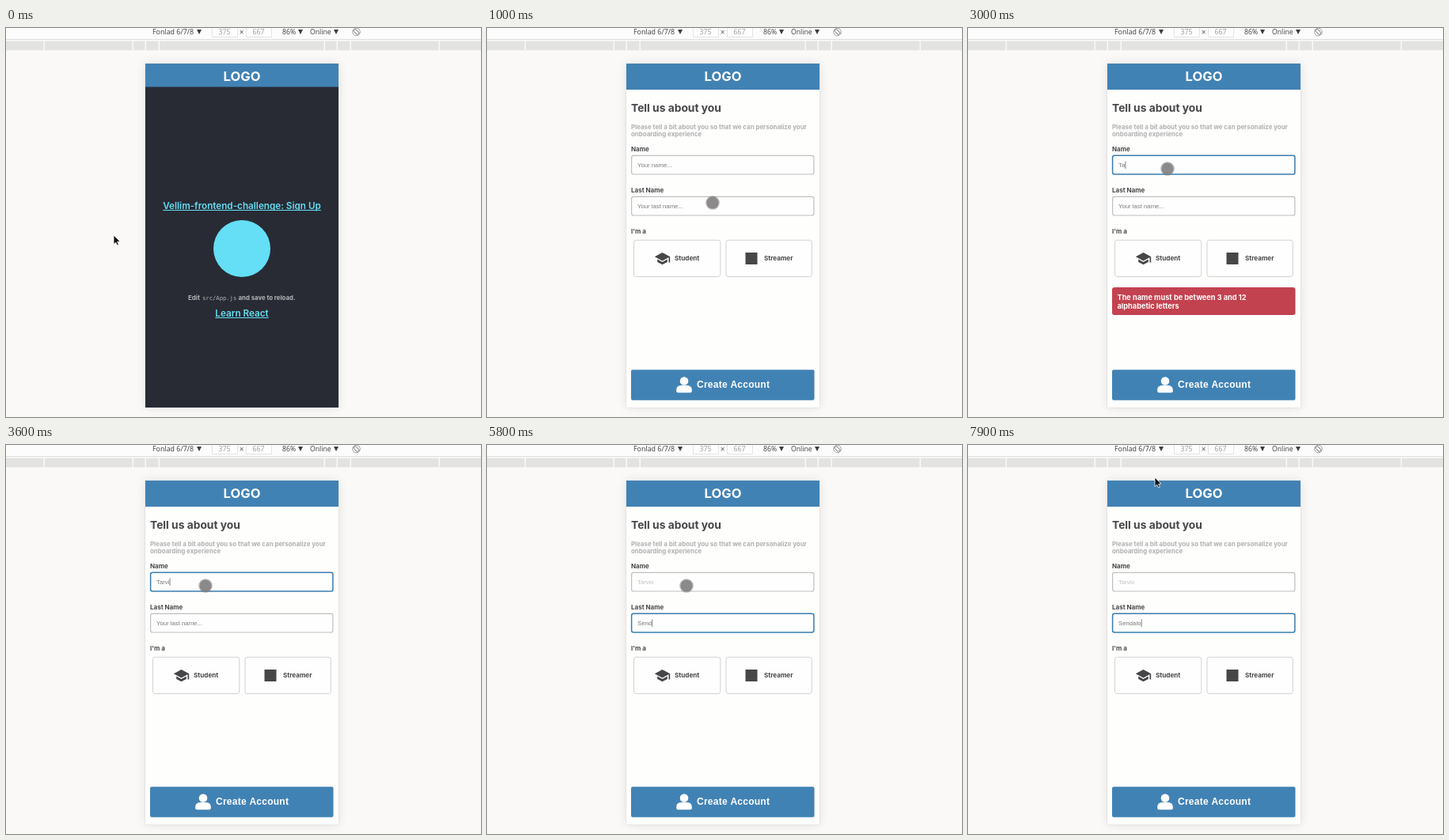
An HTML page with a canvas that plays this animation: 600 px wide and 492 px high, repeating every 8 s.

```html
<!DOCTYPE html>
<html lang="en">
<head>
<meta charset="utf-8">
<title>Sign up form</title>
<style>
html, body { margin: 0; width: 100%; height: 100%; overflow: hidden; background: #faf9f8; }
canvas { display: block; width: 600px; height: 492px; }
</style>
</head>
<body>
<canvas id="stage"></canvas>
<script>
const W = 600, H = 492, LOOP = 8000, STEP = 100;
const canvas = document.getElementById('stage');
const ctx = canvas.getContext('2d');
const dpr = window.devicePixelRatio || 1;
canvas.width = W * dpr;
canvas.height = H * dpr;

const SANS = 'Inter, sans-serif';
const ARIAL = '"Liberation Sans", Arial, sans-serif';
const UI = '"Open Sans", sans-serif';
const MONO = '"DejaVu Sans Mono", monospace';
const BLUE = '#4182b4', CYAN = '#64dff5', INK = '#474648';

const FIRST = 'Tarvio', LAST = 'Sendalo';
const FIRST_KEYS = [2700, 3000, 3300, 3500, 3600, 3800];
const LAST_KEYS = [4800, 5400, 5600, 5700, 6000, 6700, 6700];
const PAGE_AT = 1000, FOCUS_FIRST = 1700, FOCUS_LAST = 4400;

// Pointer stops: time, x, y
const PATH = [
  [0, 136, 262], [100, 136, 262], [800, 285, 221], [1000, 285, 221],
  [1700, 252, 178], [7300, 252, 178], [7900, 236, 41], [8000, 236, 41]
];

function rect(x, y, w, h, color) {
  ctx.fillStyle = color;
  ctx.fillRect(x, y, w, h);
}

function box(x, y, w, h, r, fill, stroke, line = 1) {
  ctx.beginPath();
  ctx.roundRect(x, y, w, h, r);
  if (fill) { ctx.fillStyle = fill; ctx.fill(); }
  if (stroke) { ctx.strokeStyle = stroke; ctx.lineWidth = line; ctx.stroke(); }
}

function disc(x, y, r, color) {
  ctx.beginPath();
  ctx.arc(x, y, r, 0, Math.PI * 2);
  ctx.fillStyle = color;
  ctx.fill();
}

function poly(points, fill, stroke) {
  ctx.beginPath();
  points.forEach(([x, y]) => ctx.lineTo(x, y));
  ctx.closePath();
  ctx.fillStyle = fill;
  ctx.fill();
  if (stroke) { ctx.strokeStyle = stroke; ctx.lineWidth = 0.8; ctx.stroke(); }
}

function text(str, x, y, size, color, { weight = 700, family = SANS, align = 'left', gap = 0 } = {}) {
  ctx.font = `${weight} ${size}px ${family}`;
  ctx.letterSpacing = gap + 'px';
  ctx.textAlign = align;
  ctx.fillStyle = color;
  ctx.fillText(str, x, y);
  return ctx.measureText(str).width;
}

function link(str, x, y, size) {
  const w = text(str, x, y, size, CYAN, { weight: 600, align: 'center' });
  rect(x - w / 2, y + 1.5, w, 1, CYAN);
}

function toolbar() {
  rect(0, 0, W, 16, '#fdfcfc');
  rect(0, 14, W, 1, '#dedddc');
  const ui = { weight: 400, family: UI };
  const down = x => poly([[x - 3, 2], [x + 3, 2], [x, 8]], '#3c3c3c');
  text('Fonlad 6/7/8', 185, 8, 8.9, '#3c3c3c', ui);
  down(244);
  for (const [x, n] of [[260, '375'], [303, '667']]) {
    box(x + 0.5, -4.5, 32, 16, 0, '#fdfdfd', '#e4e3e3');
    text(n, x + 16, 8, 8.7, '#9b9b9b', { ...ui, align: 'center' });
  }
  text('×', 297.5, 9, 10, '#555', { ...ui, align: 'center' });
  text('86%', 349, 8, 8.7, '#3c3c3c', ui);
  down(372);
  text('Online', 384, 8, 8.7, '#3c3c3c', ui);
  down(417);

  ctx.save();
  ctx.translate(442.5, 5);
  ctx.rotate(-Math.PI / 4);
  box(-1.8, -3.6, 3.6, 7.2, 1, null, '#666', 0.9);
  ctx.restore();
  ctx.beginPath();
  ctx.arc(442.5, 5, 4.8, 0, Math.PI * 2);
  ctx.strokeStyle = '#888';
  ctx.lineWidth = 0.8;
  ctx.stroke();

  rect(0, 16.5, W, 11.7, '#e3e3e1');
  for (const x of [48, 160, 176, 193, 402, 418, 435, 547]) rect(x - 0.5, 16, 1.5, 12.5, '#fbfafa');
}

function phone(color, headerHeight) {
  ctx.save();
  ctx.shadowColor = 'rgba(0,0,0,0.1)';
  ctx.shadowBlur = 12 * dpr;
  rect(176, 45, 244, 435, color);
  ctx.restore();
  box(175.5, 44.5, 245, 436, 0, null, 'rgba(0,0,0,0.04)');
  rect(176, 45, 244, headerHeight, BLUE);
  text('LOGO', 298, 67, 16.6, '#fff', { align: 'center' });
}

function home() {
  phone('#282b34', 29.5);
  link('Vellim-frontend-challenge: Sign Up', 298, 228.5, 11.7);
  disc(298, 279, 36, CYAN);
  text('Edit', 230, 344, 7.9, '#b4b5b8');
  text('src/App.js', 248, 344, 7.2, '#b4b5b8', { weight: 400, family: MONO });
  text('and save to reload.', 293.5, 344, 7.8, '#b4b5b8');
  link('Learn React', 298, 364.5, 11.7);
}

function typed(word, keys, t) {
  return word.slice(0, keys.filter(k => k <= t).length);
}

function caretOn(t, start, keys) {
  const last = Math.max(start, ...keys.filter(k => k <= t));
  return Math.floor((t - last) / 500) % 2 === 0;
}

function field(label, y, hint, value, focused, caret) {
  text(label, 182, y - 5.5, 8, INK);
  box(182.6, y + 0.3, 230.3, 23.7, 2.5, '#fefefe', focused ? '#3a7db0' : '#c0bfbf', focused ? 1.5 : 1.2);
  const color = !value ? '#7b7b7b' : focused ? '#777' : '#c2c2c2';
  const w = text(value || hint, 190, y + 15, 7.75, color, { weight: 400, family: ARIAL });
  if (focused && caret) rect(190 + (value ? w + 0.3 : 0), y + 7.5, 0.8, 9.5, '#666');
}

function choice(x, w, label, labelX) {
  box(x, 268.3, w, 46.2, 3, '#fefefe', '#d3d2d2');
  text(label, labelX, 294, 8.1, INK);
}

function cap() {
  poly([[211.8, 289.3], [221.5, 284], [231.2, 289.3], [221.5, 294.6]], INK);
  poly([[215.2, 292.4], [221.5, 295.9], [227.8, 292.4], [227.8, 295.9], [221.5, 299.2], [215.2, 295.9]], INK);
  rect(229.5, 289.3, 1.7, 7.2, INK);
}

function alertBox(subject) {
  box(182, 328, 231.5, 35, 3, '#c3424f');
  text(`The ${subject} must be between 3 and 12`, 188.5, 343.8, 9.2, '#fff');
  text('alphabetic letters', 188.5, 354.6, 9.2, '#fff');
}

function form(t) {
  phone('#fefefd', 33);
  text('Tell us about you', 182, 106, 13.8, INK);
  text('Please tell a bit about you so that we can personalize your', 182, 128, 7.9, '#b1b0b0');
  text('onboarding experience', 182, 137, 7.9, '#b1b0b0');

  const first = typed(FIRST, FIRST_KEYS, t), last = typed(LAST, LAST_KEYS, t);
  const onLast = t >= FOCUS_LAST, onFirst = t >= FOCUS_FIRST && !onLast;
  field('Name', 161, 'Your name...', first, onFirst, caretOn(t, FOCUS_FIRST, FIRST_KEYS));
  field('Last Name', 213, 'Your last name...', last, onLast, caretOn(t, FOCUS_LAST, LAST_KEYS));

  text("I'm a", 182, 260, 8, INK);
  choice(185.5, 109.3, 'Student', 237);
  choice(302, 108.3, 'Streamer', 350);
  cap();
  rect(326.5, 284, 15, 15, INK);

  if (first && first.length < 3) alertBox('name');
  if (last && last.length < 3) alertBox('last name');

  box(182, 432.3, 231.5, 38.4, 2, BLUE);
  disc(249, 446.5, 5.3, '#fff');
  box(239.2, 452, 19.6, 9.3, [5.5, 5.5, 2, 2], '#fff');
  text('Create Account', 265, 455, 12, '#fff', { family: ARIAL, gap: 0.25 });
}

function pointerAt(t) {
  const i = PATH.findIndex(p => p[0] > t);
  const [t0, x0, y0] = PATH[i - 1], [t1, x1, y1] = PATH[i];
  const k = (t - t0) / (t1 - t0), e = k * k * (3 - 2 * k);
  return [x0 + (x1 - x0) * e, y0 + (y1 - y0) * e];
}

function arrow(x, y) {
  const shape = [[0, 0], [0, 11.5], [2.7, 9.2], [4.6, 13], [6.4, 12.2], [4.7, 8.4], [8, 8]];
  poly(shape.map(([a, b]) => [x + a, y + b]), '#111', '#fff');
}

function moveSign(x, y) {
  ctx.save();
  ctx.translate(x, y);
  for (let i = 0; i < 4; i++) {
    rect(-0.8, -4, 1.6, 4.8, '#111');
    poly([[-2.8, -2.9], [0, -6], [2.8, -2.9]], '#111');
    ctx.rotate(Math.PI / 2);
  }
  ctx.restore();
}

function pointer(t) {
  const [x, y] = pointerAt(t);
  if (x < 176 || y < 45) arrow(x, y);
  else if (t >= 4700 && t < 5600) moveSign(x - 0.5, y);
  else {
    disc(x, y, 8.8, 'rgba(120,118,118,0.5)');
    disc(x, y, 7.5, 'rgba(125,123,123,0.78)');
  }
}

function draw(t) {
  ctx.setTransform(dpr, 0, 0, dpr, 0, 0);
  rect(0, 0, W, H, '#faf9f8');
  toolbar();
  if (t < PAGE_AT) home();
  else form(t);
  pointer(t);
}

const start = performance.now();
function tick() {
  const t = (performance.now() - start) % LOOP;
  draw(Math.floor(t / STEP) * STEP);
  requestAnimationFrame(tick);
}
tick();
</script>
</body>
</html>
```
